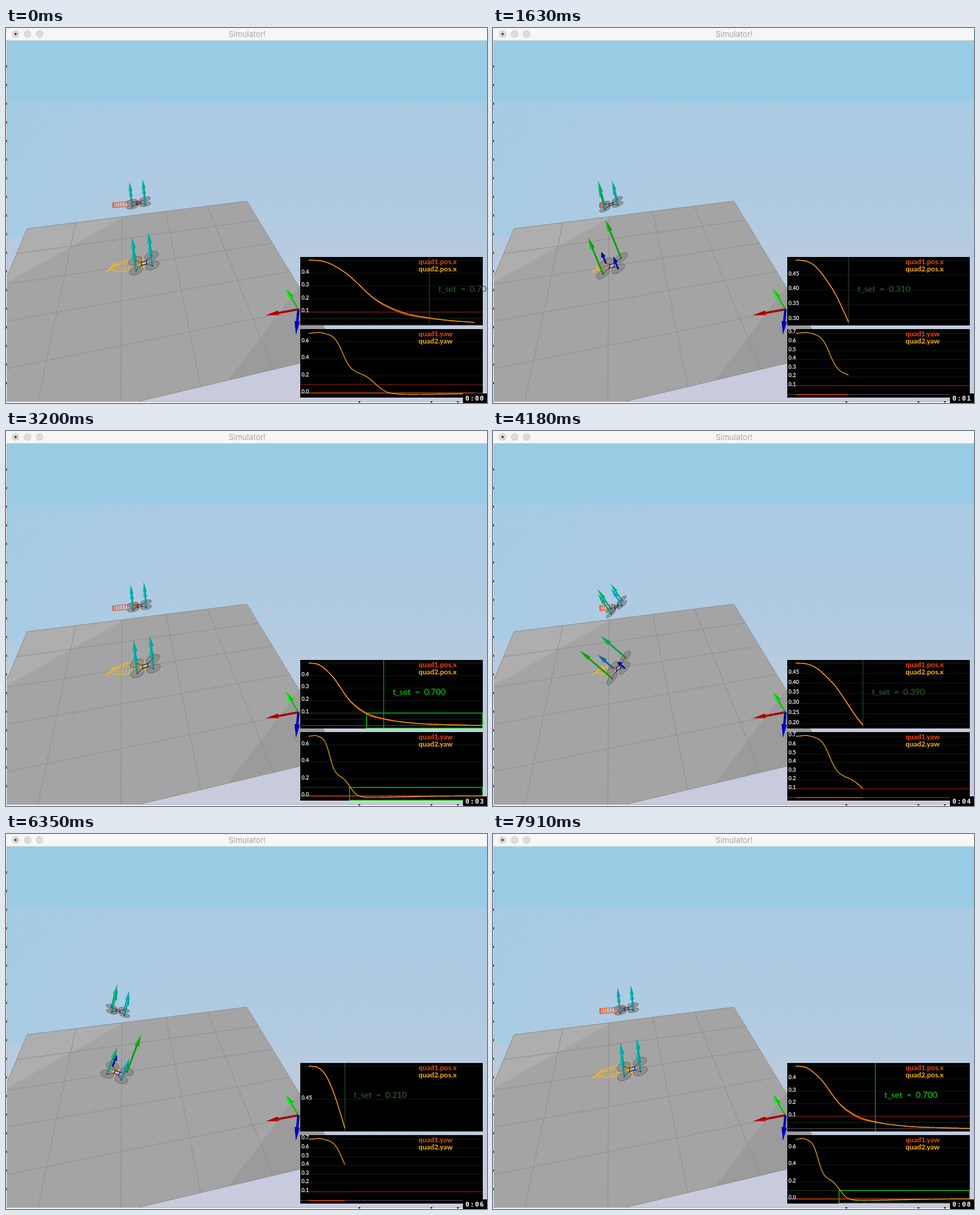
Write an HTML page with a canvas that moves like this. It is 801 px wide and 624 px high and loops after 8 s.

```html
<!DOCTYPE html>
<html lang="en">
<head>
<meta charset="utf-8">
<title>Simulator!</title>
<style>
html, body { margin: 0; width: 100%; height: 100%; overflow: hidden; background: #f4f4f4; }
canvas { display: block; width: 801px; height: 624px; }
</style>
</head>
<body>
<canvas id="stage" width="801" height="624"></canvas>
<script>
const g = document.getElementById('stage').getContext('2d');
const LOOP = 8000, STEP = 87.22, RATE = 0.84;
const STARTS = [-1145, 1265, 3695, 6090]; // simulation resets, ms

// Smooth curve through [time, value] points
function curve(pts) {
  const secant = i => (pts[i + 1][1] - pts[i][1]) / (pts[i + 1][0] - pts[i][0]);
  const slopes = pts.map(([t], i) => {
    if (!i || i === pts.length - 1) return 0;
    const h0 = t - pts[i - 1][0], h1 = pts[i + 1][0] - t;
    return (secant(i - 1) * h1 + secant(i) * h0) / (h0 + h1);
  });
  return t => {
    const i = pts.findIndex(p => p[0] > t) - 1;
    if (i < 0) return pts[t <= 0 ? 0 : pts.length - 1][1];
    const [t0, v0] = pts[i], [t1, v1] = pts[i + 1], h = t1 - t0, u = (t - t0) / h, w = 1 - u;
    return v0 * w * w * (1 + 2 * u) + v1 * u * u * (3 - 2 * u) + h * u * w * (slopes[i] * w - slopes[i + 1] * u);
  };
}
const bell = (t, mid, width) => Math.exp(-(((t - mid) / width) ** 2));
const drop = (t, mid, width) => 1 / (1 + Math.exp((mid - t) / width));

const posB = curve([[0, .5], [.1, .486], [.21, .406], [.39, .196], [.54, .1], [.7, .055], [.97, .02], [1.3, .007], [1.8, .001]]);
const posA = t => posB(t) - .009 * bell(t, .54, .17);
const yawA = () => 0;
const yawB = t => .7 - .46 * drop(t, .197, .025) - .26 * drop(t, .385, .035)
  + .02 * (1 - Math.exp(-(t ** 4))) + .011 * bell(t, .06, .03);
const pitch = t => 33 * bell(t, .16, .09) - 27 * bell(t, .42, .12) - 8 * bell(t, .6, .2);
const twistB = t => 23 * bell(t, .32, .16) - 16 * bell(t, .1, .06);
const leanB = t => 9 * bell(t, .42, .1) - 9 * bell(t, .22, .09);
const leanA = t => 4 * bell(t, .32, .2);

// a, b: half arms on screen; up: body normal of the same length
const QUADS = [
  { from: [178, 295], to: [222.5, 291], a: [11, -2], b: [.3, 4.2], up: [-1.3, -11.5], lift: 33, w: 2.2,
    tilt: 1, color: '#ff4500', pos: posA, yaw: yawA, twist: () => 0, lean: leanA },
  { from: [174, 399], to: [232, 391], a: [13.5, -4], b: [.5, 8], up: [-1.7, -11.5], lift: 39.5, w: 2.8,
    tilt: 1.17, color: '#ffc000', pos: posB, yaw: yawB, twist: twistB, lean: leanB }
];

const mix = (p, q, u, v) => [p[0] * u + q[0] * v, p[1] * u + q[1] * v];
const add = (p, q, s = 1) => [p[0] + q[0] * s, p[1] + q[1] * s];

function path(pts, close) {
  g.beginPath();
  pts.forEach(p => g.lineTo(p[0], p[1]));
  if (close) g.closePath();
}
function line(pts, color, width = 1) {
  path(pts);
  g.strokeStyle = color;
  g.lineWidth = width;
  g.stroke();
}
function poly(pts, color) {
  path(pts, true);
  g.fillStyle = color;
  g.fill();
}
function rect(x, y, w, h, color) {
  g.fillStyle = color;
  g.fillRect(x, y, w, h);
}
function disc(x, y, r, color) {
  g.beginPath();
  g.arc(x, y, r, 0, 7);
  g.fillStyle = color;
  g.fill();
}
function text(s, x, y, font, color) {
  g.font = font;
  g.fillStyle = color;
  g.fillText(s, x, y);
}

function arrow(p, q, head, half, width, dark, light) {
  const len = Math.hypot(q[0] - p[0], q[1] - p[1]) || 1;
  const d = [(q[0] - p[0]) / len, (q[1] - p[1]) / len], n = [-d[1], d[0]];
  const neck = add(q, d, -Math.min(head, len));
  line([p, neck], dark, width);
  poly([add(neck, n, half), q, add(neck, n, -half)], light);
  poly([add(neck, n, half), q, neck], dark);
}

// Perspective map of the unit square onto the floor
function floorPoint(u, v) {
  const [A, B, C, D] = FLOOR;
  const sum = [0, 1].map(i => A[i] - B[i] + C[i] - D[i]);
  const e = add(B, C, -1), f = add(D, C, -1);
  const det = e[0] * f[1] - f[0] * e[1];
  const m = (sum[0] * f[1] - f[0] * sum[1]) / det, n = (e[0] * sum[1] - sum[0] * e[1]) / det;
  const w = m * u + n * v + 1;
  return [0, 1].map(i => ((B[i] - A[i] + m * B[i]) * u + (D[i] - A[i] + n * D[i]) * v + A[i]) / w);
}
const FLOOR = [[35, 334], [401, 288], [556, 542], [-119, 702]];

function world() {
  rect(0, 0, 801, 624, '#f4f4f4');
  const sky = g.createLinearGradient(0, 122, 0, 621);
  sky.addColorStop(0, '#a9cae2');
  sky.addColorStop(.455, '#b2cbe1');
  sky.addColorStop(.456, '#b5cbe0');
  sky.addColorStop(.8, '#c5cbde');
  sky.addColorStop(1, '#cacbdd');
  const side = g.createLinearGradient(0, 0, 260, 0);
  side.addColorStop(0, 'rgba(160,204,230,.6)');
  side.addColorStop(1, 'rgba(160,204,230,0)');
  rect(2, 122, 799, 499, sky);
  rect(2, 122, 260, 227, side);
  rect(2, 21, 799, 101, '#9acbe5');

  g.save();
  g.beginPath();
  g.rect(2, 21, 799, 600);
  g.clip();
  poly(FLOOR, '#a4a4a4');
  poly([[35, 334], [193, 314], [193, 316], [-4, 426]], '#aeaeae');
  poly([[370, 586], [489, 430], [556, 542]], '#9b9b9b');
  for (let i = 0; i <= 5; i++) {
    line([floorPoint(i / 5, 0), floorPoint(i / 5, 1)], '#8e8e8e');
    line([floorPoint(0, i / 5), floorPoint(1, i / 5)], '#8e8e8e');
  }
  g.restore();

  // window frame and the strip behind it
  rect(0, 0, 801, 20, '#f6f6f6');
  rect(0, 20, 801, 1, '#d9dde0');
  rect(0, 21, 1, 603, '#f2f2f2');
  rect(1, 21, 1, 600, '#a9b4ba');
  rect(0, 621, 801, 1, '#aaaeb4');
  rect(0, 622, 801, 2, '#f2f2f2');
  for (let y = 62; y < 610; y += 31) rect(0, y, 1.4, 4, '#444');
  for (const x of [587, 707, 751]) rect(x, 621, 3, 2, '#222');
  for (const x of [16, 36, 56]) {
    disc(x, 10, 6, '#c9c9c9');
    disc(x, 10, 5, '#dcdcdc');
  }
  disc(16, 10, 2, '#444');
  g.textAlign = 'center';
  text('Simulator!', 401.5, 15, '13px Inter, sans-serif', '#a6a6a6');
  g.textAlign = 'left';

  const o = [487, 468];
  arrow(o, [466, 434], 17, 4.5, 2.5, '#00c400', '#00fa00');
  arrow(o, [433, 478], 21, 4, 3.5, '#a80000', '#c80000');
  arrow(o, [483, 510], 22, 4.5, 4, '#0000b4', '#0000dc');
}

function pose(q, t) {
  const th = q.tilt * pitch(t) * Math.PI / 180, yaw = q.yaw(t), c = Math.cos(yaw), s = Math.sin(yaw);
  const a = mix(q.a, q.up, Math.cos(th), -Math.sin(th));
  return {
    at: mix(q.to, q.from, 1 - 2 * q.pos(t), 2 * q.pos(t)),
    up: mix(q.up, q.a, Math.cos(th), Math.sin(th)),
    flat: a, x: mix(a, q.b, c, s), y: mix(q.b, a, c, -s)
  };
}

function trail(q, t) {
  const top = [], low = [];
  for (let s = 0; s <= Math.min(t, 1.1); s += .04) {
    const p = pose(q, s), ends = [add(p.at, p.y, -1), add(p.at, p.y)];
    top.push(ends[0]);
    low.push(ends[1]);
    line(ends, q.color, .9);
  }
  line(top, q.color, .9);
  line(low, q.color, .9);
}

// Weak thrust is blue, hover cyan, strong green
function thrustColor(r, light) {
  const hue = 178 - (r - 1) * (r > 1 ? 92 : 124);
  return `hsl(${Math.max(118, Math.min(240, hue))},100%,${light}%)`;
}

function quad(q, t) {
  trail(q, t);
  const p = pose(q, t), upLen = Math.hypot(...p.up);
  const arms = [[-1, -1], [1, -1], [-1, 1], [1, 1]].map(([i, j]) => ({
    i, j, c: add(add(p.at, p.x, i), p.y, j)
  }));
  for (const { c } of arms) {
    g.beginPath();
    for (let k = 0; k < 24; k++) {
      const f = k * Math.PI / 12;
      g.lineTo(...add(add(c, p.flat, .84 * Math.cos(f)), q.b, .84 * Math.sin(f)));
    }
    g.closePath();
    g.fillStyle = 'rgba(132,132,132,.72)';
    g.fill();
    g.strokeStyle = '#626262';
    g.lineWidth = .9;
    g.stroke();
  }
  line([arms[0].c, arms[3].c], '#555', 1.2);
  line([arms[1].c, arms[2].c], '#555', 1.2);
  const box = [[-1, -1], [1, -1], [1, 1], [-1, 1]].map(([i, j]) => add(add(p.at, p.x, i * .32), p.y, j * .34));
  poly(box, '#b9bccb');
  line([...box, box[0]], '#15153c', 1.3);
  for (const { i, j, c } of arms) {
    const len = q.lift * (1 + .1 * bell(t, .32, .2)) - i * q.lean(t) - i * j * q.twist(t), r = len / q.lift;
    rect(c[0] - 1.2, c[1] - 1.2, 2.4, 2.4, '#10106a');
    arrow(c, add(c, p.up, len / upLen), Math.min(19, len * .47), q.w * 1.4, q.w,
      thrustColor(r, 31), thrustColor(r, 37));
  }
}

// Auto-scaled plot of two channels with a +-0.1 band
function plot(top, f1, f2, name, t, { max, floor, settled, marker }) {
  const X0 = 504, L = 490, R = 794, H = 114;
  const px = 290 / Math.max(t, 1.01), done = t > 1.2, shown = Math.min(t, .7), mark = X0 + shown * px;
  let min = floor;
  for (let s = 0; s < t + .01; s += .01) min = Math.min(min, f1(Math.min(s, t)), f2(Math.min(s, t)));
  const range = Math.max(max - min, .0005);
  const Y = v => top + 5.4 + (max - v) / range * 103.4;
  const across = (v, color) => line([[L, Y(v)], [R, Y(v)]], color);
  const step = [.0001, .0005, .001, .005, .01, .05, .1, .2].find(s => range / s < 7.2);
  const digits = Math.ceil(-Math.log10(step) - 1e-9);
  const ticks = [];
  for (let i = Math.ceil((min + .001) / step); i * step <= max + 1e-6; i++) ticks.push(i * step);

  g.save();
  g.beginPath();
  g.rect(L, top, R - L + .5, H);
  g.clip();
  rect(L, top, R - L, H, '#000');
  ticks.forEach(v => across(v, '#111c12'));
  across(0, '#5a5a5a');
  const ok = t >= settled + 1;
  across(.1, ok ? '#26402a' : '#9c1a16');
  if (marker) {
    across(.05, '#173017');
    line([[mark, top], [mark, top + H]], done ? '#00b800' : '#23492a', 1.2);
  }
  if (ok) {
    const x = X0 + settled * px, y = Y(.1);
    g.strokeStyle = '#00e000';
    g.lineWidth = 1.2;
    g.strokeRect(x, y, R - x - .3, Math.min(Y(-.1), top + H - .6) - y);
  }
  [[f1, '#ff4500'], [f2, '#ffb400']].forEach(([f, color]) => {
    const pts = [];
    for (let s = 0; s < t; s += 1 / px) pts.push([X0 + s * px, Y(f(s))]);
    pts.push([X0 + t * px, Y(f(t))]);
    line(pts, color, 1.2);
  });
  g.restore();

  ticks.filter(v => Y(v) > top + 6).forEach(v =>
    text(v.toFixed(digits), 492, Y(v) + .6, 'bold 9px Lato, sans-serif', '#eee'));
  const font = 'bold 11.8px Lato, sans-serif';
  text('quad1.' + name, 687, top + 12, font, '#ff4500');
  text('quad2.' + name, 687, top + 23.5, font, '#ffb400');
  if (marker) {
    text(`t_set\u00a0 =\u00a0 ${shown.toFixed(2)}0`, mark + 15, top + 58, '14px Lato, sans-serif', done ? '#00e000' : '#2c672f');
  }
}

function draw(ms) {
  const k = Math.floor((ms + 1 - 60) / STEP);
  const at = k < 0 ? 0 : 60 + k * STEP;
  const start = STARTS.filter(s => s <= at).pop();
  const t = Math.max(.01, (at - start) * RATE / 1000);
  world();
  QUADS.forEach(q => quad(q, t));
  plot(381, posA, posB, 'pos.x', t, { max: .5, floor: .5, settled: .54, marker: true });
  plot(501, yawA, yawB, 'yaw', t, { max: .71, floor: 0, settled: .381, marker: false });
  rect(761, 608, 40, 16, '#000');
  g.letterSpacing = '1.4px';
  text('0:0' + Math.floor(at * .00102 + .04), 765, 619.5, 'bold 11px "DejaVu Sans Mono", monospace', '#fff');
  g.letterSpacing = '0px';
}

function tick() {
  draw(performance.now() % LOOP);
  requestAnimationFrame(tick);
}
tick();
</script>
</body>
</html>
```
